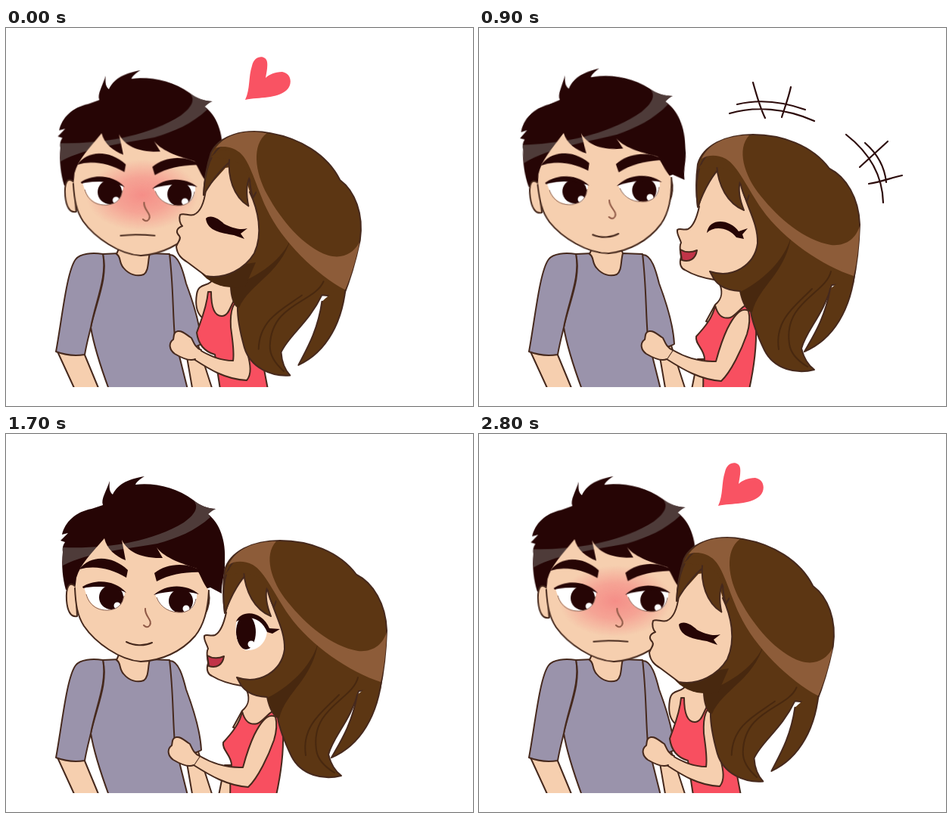
Recreate the animation shown at these times as an HTML page. Size 617x500 px, loop 3100 ms.

```html
<!DOCTYPE html>
<html lang="en">
<head>
<meta charset="utf-8">
<title>Kiss me</title>
<style>
  html, body { margin: 0; width: 100%; height: 100%; overflow: hidden; background: #fff; }
  svg { display: block; width: 100%; height: 100%; }

  .skin { fill: #f6cfaf; }
  .shirt { fill: #9a93ab; }
  .tank { fill: #f84f60; }
  .ink { stroke: #46291d; stroke-width: 2; stroke-linecap: round; stroke-linejoin: round; }
  .line { fill: none; }
  .dark { fill: #260505; }
  .brown { fill: #5c3613; }
  .shade { fill: #48280f; }
  .strand { fill: none; stroke: #48280f; stroke-width: 2; stroke-linecap: round; }
  .white { fill: #fff; }
  .mouth { fill: #c13448; }

  .kiss, .stand, .laugh, .open, .closed, .bubble, .grin, .pout, .smile, .speak,
  .head, .heart, .puff-top, .puff-right {
    animation: 3.1s step-end infinite;
  }
  .kiss { animation-name: kiss; }
  .stand { animation-name: stand; }
  .laugh { animation-name: laugh; }
  .open { animation-name: open; }
  .closed { animation-name: closed; }
  .bubble, .pout { animation-name: talk; }
  .grin { animation-name: grin; }
  .smile { animation-name: smile; }
  .speak { animation-name: speak; }
  .heart { animation-name: rise; }
  .head { animation-name: tilt; transform-origin: 180px 300px; }
  .puff-top { --away: translate(-1px, -13px); animation-name: puff; }
  .puff-right { --away: translate(6px, -5px); animation-name: puff; }

  @keyframes kiss { 0%, 80.645%, 100% { opacity: 1; } 3.226% { opacity: 0; } }
  @keyframes stand { 0%, 80.645%, 100% { opacity: 0; } 3.226% { opacity: 1; } }
  @keyframes laugh { 0%, 54.839%, 100% { opacity: 0; } 3.226% { opacity: 1; } }
  @keyframes open { 0%, 54.839%, 100% { opacity: 1; } 29.032% { opacity: 0; } }
  @keyframes closed { 0%, 54.839%, 100% { opacity: 0; } 29.032% { opacity: 1; } }
  @keyframes talk { 0%, 80.645%, 100% { opacity: 0; } 61.29% { opacity: 1; } }
  @keyframes grin { 0%, 80.645%, 100% { opacity: 1; } 61.29% { opacity: 0; } }
  @keyframes smile { 0%, 70.968%, 100% { opacity: 0; } 3.226% { opacity: 1; } }
  @keyframes speak { 0%, 80.645%, 100% { opacity: 0; } 70.968% { opacity: 1; } }
  @keyframes rise { 0%, 90.323%, 100% { transform: none; } 80.645% { transform: translateY(-10px); } }
  @keyframes tilt {
    0%, 80.645%, 100% { transform: rotate(-1.3deg); }
    3.226% { transform: translate(-7px, -3px) rotate(-4deg); }
    54.839% { transform: none; }
  }
  @keyframes puff {
    0%, 16.129%, 29.032%, 41.935%, 54.839%, 100% { transform: none; }
    9.677%, 22.581%, 35.484%, 48.387% { transform: var(--away); }
  }
</style>
</head>
<body>
<svg viewBox="0 0 617 500" preserveAspectRatio="none">
  <defs>
    <radialGradient id="blush">
      <stop offset="0" stop-color="#f4787a" stop-opacity=".75"/>
      <stop offset=".5" stop-color="#f4787a" stop-opacity=".5"/>
      <stop offset="1" stop-color="#f4787a" stop-opacity="0"/>
    </radialGradient>
    <clipPath id="eyeL"><path d="M103 201C120 195 143 197 157 208C156 224 149 233 135 233C119 233 107 223 103 201Z"/></clipPath>
    <clipPath id="eyeR"><path d="M197 211C213 202 236 202 252 211C253 224 246 235 232 236C214 236 201 228 197 211Z"/></clipPath>
    <clipPath id="eyeG"><path d="M304 250C310 235 340 236 345 260C344 277 332 287 318 286C307 284 302 268 304 250Z"/></clipPath>

    <g id="hair">
      <path class="brown ink" d="M289 236C286 215 287 195 289 180C296 156 325 141 362 141C400 141 440 155 463 186C485 197 502 225 503 260C502 290 499 315 494 338L466 340C455 380 432 400 426 424C430 440 436 447 443 452C420 458 390 452 377 426C367 405 361 388 359 375C353 372 348 362 345 348C325 347 312 340 305 322L330 250Z"/>
      <path class="shade" d="M413 272C408 300 380 332 345 349C350 366 354 373 361 376C370 340 406 325 413 272Z"/>
      <path class="strand" d="M465 322C458 352 402 362 410 418C412 432 424 442 434 448M440 345C420 366 390 385 396 425"/>
    </g>
    <path id="wisp" class="brown ink" d="M497 318C492 372 468 412 430 428C440 410 457 385 464 345"/>
    <g id="locks">
      <path class="brown ink" d="M289 237C285 203 288 178 305 165L334 165L322 181C307 195 297 215 289 237Z"/>
      <path class="brown ink" d="M314 182C316 208 328 232 350 241C344 226 342 214 345 203C347 214 350 222 354 229L360 212L335 174Z"/>
      <path class="brown" d="M290 186C300 168 330 165 350 190L378 235L360 225L335 190L317 184Z"/>
      <path fill="#8d5c39" d="M294 173C304 152 328 142 357 142C340 160 350 195 372 222C396 252 430 281 465 287C485 289 498 278 503 262C502 290 499 312 495 328C455 315 402 280 374 240C355 213 342 182 326 173C314 167 302 168 294 173Z"/>
    </g>
    <g id="hand">
      <path class="skin ink" d="M256 426C248 423 246 416 243 410C236 406 232 400 225 401C219 402 220 408 219 412C212 417 214 426 221 431C231 437 241 441 248 438"/>
    </g>
  </defs>

  <!-- Boy's body -->
  <g class="ink">
    <path class="skin" d="M68 428L90 476H122L103 430Z"/>
    <path class="skin" d="M236 418L246 476H272L254 420Z"/>
    <path class="shirt" d="M216 300C228 299 234 322 238 338C250 370 257 398 258 418Q250 423 238 424L221 400Z"/>
    <path class="shirt" d="M128 299L150 298C165 305 178 304 190 298L216 299C221 340 220 370 223 410L240 478H136C125 448 116 420 112 396C120 360 135 330 128 299Z"/>
    <path class="shirt" d="M128 299C114 297 98 298 92 306C80 322 74 385 66 428Q84 435 104 432C107 415 110 405 112 396C118 362 134 330 128 299Z"/>
    <path class="skin" d="M146 299C152 302 149 310 155 317C163 327 174 329 182 326C189 321 187 309 190 298L185 285H152Z"/>
  </g>

  <!-- Boy's head -->
  <g class="head">
    <path class="dark" d="M79 206C75 192 73 174 75 156C74 150 76 146 78 143L72 141L82 131L74 133C78 116 92 103 113 99L128 94C125 86 133 75 137 62C136 72 137 77 141 80C147 68 158 60 183 56C176 60 172 64 171 67C196 64 226 71 247 87C256 95 268 99 277 99C271 102 269 104 267 106C282 118 291 140 289 170C290 185 284 196 285 211L270 203L180 230Z"/>
    <path fill="#4e3b39" d="M75 150C130 152 190 144 235 117C252 105 255 95 247 87C256 95 268 99 277 99C271 102 269 104 267 106L270 110C250 128 226 138 200 145C160 152 110 156 75 174Z"/>
    <path class="skin ink" d="M92 202C83 193 79 204 80 220C81 233 85 243 94 241Z"/>
    <path class="skin ink" d="M264 205C272 208 270 238 254 248Z"/>
    <path class="skin" d="M91 207L93 190C98 172 113 158 130 138C133 152 145 162 158 167L153 140C160 155 178 165 207 164L199 150C210 165 235 172 252 178C258 190 262 200 268 207C267 230 262 252 250 267C232 288 205 300 178 301C150 299 118 276 103 254C94 240 92 225 91 207Z"/>
    <path class="line ink" d="M91 204C92 225 94 240 103 254C118 276 150 299 178 301C205 300 232 288 250 267C262 252 267 230 268 207"/>
    <ellipse class="kiss" cx="182" cy="221" rx="74" ry="47" fill="url(#blush)"/>

    <path class="dark" d="M97 179C111 160 140 160 161 180L159 190C139 178 117 173 97 179Z"/>
    <path class="dark" d="M196 184C213 170 243 169 260 183C240 182 217 185 199 195Z"/>

    <g clip-path="url(#eyeL)">
      <rect class="white" x="100" y="190" width="60" height="45"/>
      <circle class="dark" cx="139" cy="216" r="16"/>
      <circle class="white" cx="147" cy="227" r="4.5"/>
    </g>
    <g clip-path="url(#eyeR)">
      <rect class="white" x="194" y="198" width="60" height="40"/>
      <circle class="dark" cx="231" cy="221" r="16"/>
      <circle class="white" cx="238" cy="231" r="4.5"/>
    </g>
    <path class="dark" d="M101 202C118 191 145 193 159 210C142 202 120 200 102 204Z"/>
    <path class="dark" d="M195 213C212 198 238 198 255 212C236 207 214 207 195 213Z"/>
    <path fill="none" stroke="#8a6252" d="M106 212C110 227 121 234 136 233C148 232 154 225 156 214M199 216C204 230 217 237 233 236C244 234 249 228 251 218"/>
    <path fill="none" stroke="#905a47" stroke-width="2" stroke-linecap="round" d="M184 231C183 241 194 246 190 253C187 257 184 255 182 253"/>

    <path class="smile line ink" d="M159 275C169 280 182 281 193 276"/>
    <path class="speak mouth ink" d="M160 270C171 276 184 276 195 273C190 283 174 283 160 270Z"/>
    <path class="kiss line ink" d="M152 274C166 273 184 273 197 275"/>
  </g>

  <!-- Girl beside him -->
  <g class="stand">
    <g class="ink">
      <path class="skin" d="M281 478L289 438L300 438L297 478Z"/>
      <path class="skin" d="M316 334C323 348 322 358 312 366L300 388L320 395L352 378L362 350Z"/>
      <path class="tank" d="M312 367C309 383 298 396 287 408C285 418 298 425 298 438C295 450 297 465 296 478H357C362 455 367 425 366 395L360 366C348 364 343 378 332 383C320 386 315 378 312 367Z"/>
      <path class="skin" d="M356 374C345 368 335 384 328 398C320 415 316 430 313 441C292 442 273 436 256 426L248 438C270 452 292 465 320 467C333 455 347 425 354 405C358 392 358 382 356 374Z"/>
    </g>
    <use href="#hand"/>
    <use href="#hair"/>
    <use href="#wisp"/>
    <path class="skin" d="M303 196L291 236C288 250 284 262 276 266C270 268 265 264 262 267C261 273 266 279 267 284C264 289 266 295 267 303C264 312 267 318 272 320C285 328 298 331 311 333L305 322C335 332 364 314 368 285C369 257 352 235 346 205L322 178Z"/>
    <path class="line ink" d="M291 236C288 250 284 262 276 266C270 268 265 264 262 267C261 273 266 279 267 284C264 289 266 295 267 303C264 312 267 318 272 320C285 328 298 331 311 333L305 322C335 332 364 314 368 285C369 257 352 235 346 205"/>
    <use href="#locks"/>
    <g class="open">
      <g clip-path="url(#eyeG)">
        <rect class="white" x="300" y="234" width="48" height="54"/>
        <ellipse class="dark" cx="317" cy="262" rx="13" ry="23"/>
        <circle class="white" cx="324" cy="278" r="4.5"/>
      </g>
      <path class="dark" d="M304 248C311 231 339 234 348 257L362 258L352 264L345 262C338 244 321 238 304 248Z"/>
    </g>
    <path class="closed dark" d="M301 271C304 250 332 253 343 269L355 265L348 273L350 279L340 277C330 264 311 261 301 271Z"/>
    <path class="grin mouth ink" d="M266 293C274 298 281 297 288 294C286 306 278 310 268 307Z"/>
    <path class="pout mouth ink" d="M267 301C274 300 278 304 276 311C272 309 270 311 267 309Z"/>
  </g>

  <!-- Girl leaning in -->
  <g class="kiss">
    <g class="ink">
      <path class="skin" d="M272 334C268 342 254 337 252 352C250 365 252 376 258 382L300 400L318 345Z"/>
      <path class="tank" d="M267 349C265 371 257 388 252 403C254 418 262 428 276 432L283 478H346L335 420L310 354C296 357 298 381 285 381C275 381 271 370 271 349Z"/>
      <path class="skin" d="M312 359C298 360 296 378 297 396C299 412 302 428 300 440C282 440 268 433 256 426L248 438C268 451 290 465 318 466C325 458 323 445 319 430Z"/>
    </g>
    <use href="#hand" x="2"/>
    <g transform="translate(-33 -21) rotate(10 263 268)">
      <use href="#hair"/>
      <use href="#wisp" transform="rotate(-12 482 330)"/>
    </g>
    <path class="shade" d="M256 322C270 340 290 346 316 342L330 310Z"/>
    <path class="skin" d="M290 185L264 214C262 230 258 243 248 247C241 249 235 244 230 247C228 253 230 259 233 262C225 265 224 270 229 275C232 279 227 283 225 289C226 300 232 305 240 310L264 328C290 333 316 318 328 298C340 272 333 240 322 217L312 182Z"/>
    <path class="line ink" d="M264 214C262 230 258 243 248 247C241 249 235 244 230 247C228 253 230 259 233 262C225 265 224 270 229 275C232 279 227 283 225 289C226 300 232 305 240 310L264 328C290 333 316 318 328 298C340 272 333 240 322 217"/>
    <use href="#locks" transform="translate(-33 -21) rotate(10 263 268)"/>
    <path class="dark" d="M264 252C270 246 281 252 288 259C298 264 309 268 319 265L310 272L315 279L301 274C285 271 266 269 264 252Z"/>
    <path class="heart" fill="#f95363" d="M316 95C323 80 320 65 325 50C328 36 343 35 345 45C346 52 344 60 343 66C347 62 355 58 365 58C377 60 379 74 371 82C358 94 335 91 316 95Z"/>
  </g>

  <g class="laugh" fill="none" stroke="#2c0b0b" stroke-width="2.2" stroke-linecap="round">
    <path class="puff-top" d="M331 113C365 103 405 106 443 123M341 101C370 94 400 97 431 108M362 72C366 86 371 105 378 119M412 78C409 92 404 105 400 118"/>
    <path class="puff-right" d="M485 141C512 162 533 190 534 231M510 152C526 166 536 184 538 204M503 184L540 150M515 206C530 204 545 198 559 195"/>
  </g>

  <g class="bubble">
    <path class="white ink" d="M303 120C310 112 310 106 308 100C293 88 292 62 302 50C320 26 370 24 410 34C460 46 510 75 526 115C534 145 510 163 485 158C455 150 430 125 400 107C375 95 345 95 327 99C322 108 315 116 303 120Z"/>
    <path id="arc" fill="none" d="M335 83C365 80 395 78 420 87C445 96 470 115 510 140"/>
    <text font-family="'DejaVu Sans', sans-serif" font-size="33" font-weight="bold" fill="#0c0606"><textPath href="#arc">Kiss me!</textPath></text>
  </g>

  <rect class="white" y="475" width="617" height="25"/>
</svg>
</body>
</html>
```
